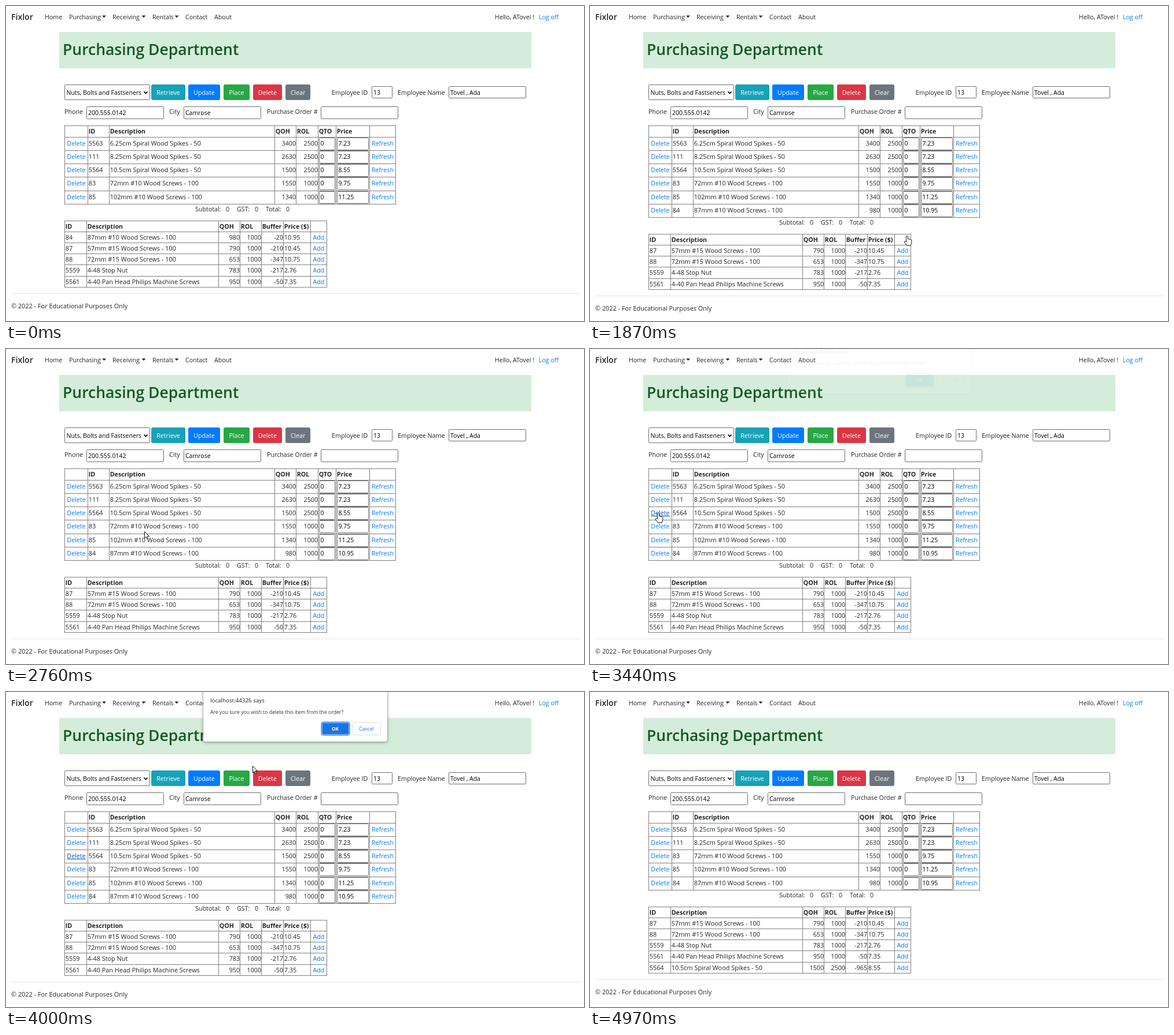
These frames come from a looping animation (999x546 px, 6230 ms). An HTML page:

```html
<!DOCTYPE html>
<html lang="en">
<head>
<meta charset="utf-8">
<title>Purchasing Department</title>
<style>
  html, body { margin: 0; width: 100%; height: 100%; overflow: hidden; background: #fff; }
  svg { display: block; width: 999px; height: 546px; }
  text { font: 10.7px "Open Sans", "Noto Sans", sans-serif; fill: #212529; white-space: pre; }
  .left, .foot { font-size: 10.9px; }
  .bold { font-weight: 700; }
  .right { text-anchor: end; }
  .mid, .link { text-anchor: middle; }
  .field { font-size: 10.5px; fill: #000; }
  .link { fill: #007bff; }
  .hover { fill: #0056b3; text-decoration: underline; }
  .white { fill: #fff; }
  .brand { font-size: 14.1px; font-weight: 600; }
  .title { font-size: 26.5px; font-weight: 600; fill: #155724; }
  .says { font-size: 9.8px; fill: #202124; }
  .small { font-size: 8.7px; fill: #333; }
  .ok { font-size: 8.3px; font-weight: 700; fill: #fff; }
  .cancel { font-size: 8.3px; fill: #1a73e8; }
</style>
</head>
<body>
<svg id="stage" viewBox="0 0 999 546"></svg>
<script>
const LOOP = 6230, FRAME = 70, FIRST_FRAME = 10;

// id | description | on hand | reorder level | price | already ordered
const PARTS = `
5563|6.25cm Spiral Wood Spikes - 50|3400|2500|7.23
111|8.25cm Spiral Wood Spikes - 50|2630|2500|7.23
5564|10.5cm Spiral Wood Spikes - 50|1500|2500|8.55|35
83|72mm #10 Wood Screws - 100|1550|1000|9.75
85|102mm #10 Wood Screws - 100|1340|1000|11.25
84|87mm #10 Wood Screws - 100|980|1000|10.95
87|57mm #15 Wood Screws - 100|790|1000|10.45
88|72mm #15 Wood Screws - 100|653|1000|10.75
5559|4-48 Stop Nut|783|1000|2.76
5561|4-40 Pan Head Philips Machine Screws|950|1000|7.35`
  .trim().split("\n").map(line => {
    const [id, description, onHand, reorder, price, ordered = 0] = line.split("|");
    return { id, description, onHand, reorder, price, buffer: +onHand + +ordered - reorder };
  });

const text = (x, y, s, cls = "", id = "") =>
  `<text x="${x}" y="${y}" class="${cls}" id="${id}">${s}</text>`;
const rect = (x, y, w, h, fill, stroke = "none", r = 0) =>
  `<rect x="${x}" y="${y}" width="${w}" height="${h}" rx="${r}" fill="${fill}" stroke="${stroke}"/>`;
const crisp = v => Math.floor(v) + 0.5;
const input = (x, y, w, h, value) =>
  rect(crisp(x), crisp(y), w - 1, h - 1, "#fff", "#6f6f6f", 1) + text(x + 3, y + 15, value, "field");
const button = (x, w, label, color) =>
  rect(x, 136, w, 27, color, "none", 3) + text(x + w / 2, 154, label, "mid white");
const caret = x => `<path d="M${x} 16.5h7l-3.5 3.7z" fill="#212529"/>`;

const column = (width, kind, header, value) => ({ width, kind, header, value });
const ORDER_COLUMNS = [
  column(40, "link", "", () => "Delete"),
  column(37, "left", "ID", p => p.id),
  column(286, "left", "Description", p => p.description),
  column(37, "right", "QOH", p => p.onHand),
  column(38, "right", "ROL", p => p.reorder),
  column(31, "field", "QTO", () => 0),
  column(58, "field", "Price", p => p.price),
  column(45, "link", "", () => "Refresh")
];
const STOCK_COLUMNS = [
  column(38, "left", "ID", p => p.id),
  column(228, "left", "Description", p => p.description),
  column(37, "right", "QOH", p => p.onHand),
  column(37, "right", "ROL", p => p.reorder),
  column(38, "right", "Buffer", p => p.buffer),
  column(47, "left", "Price ($)", p => p.price),
  column(28, "link", "", () => "Add")
];

function cell(kind, x, width, y, value, id) {
  if (kind === "field") return input(x + 2, y - 14, width - 3, 22, "") + text(x + 4.5, y, value, kind);
  const offset = { left: 1.7, right: width, link: width / 2 + 0.5 }[kind];
  return text(x + offset, y, value, kind, id);
}

function table(name, columns, parts, top, headHeight, rowHeight, drop) {
  const rowTop = i => Math.floor(top + headHeight + rowHeight * i);
  const bottom = rowTop(parts.length);
  let x = 101, cells = "", lines = `M${crisp(x)} ${crisp(top)}V${crisp(bottom)}`;
  for (const { width, kind, header, value } of columns) {
    cells += text(x + 1.7, top + 14, header, "bold");
    parts.forEach((part, i) => {
      const shown = value(part);
      cells += cell(kind, x, width, rowTop(i) + drop, shown, `${name}-${shown}-${part.id}`);
    });
    x += width;
    lines += `M${crisp(x)} ${crisp(top)}V${crisp(bottom)}`;
  }
  for (const y of [top, ...parts.map((_, i) => rowTop(i)), bottom]) lines += `M101 ${crisp(y)}H${x + 1}`;
  return `<path d="${lines}" fill="none" stroke="#808080"/>` + cells;
}

function tables(name, orderIds, stockIds) {
  const find = ids => ids.map(id => PARTS.find(p => p.id === String(id)));
  const shift = 23.3 * (orderIds.length - 5);
  const footer = shift + 19.2 * (stockIds.length - 5);
  const totals = [[327, "Subtotal:", 380], [399, "GST:", 430], [449, "Total:", 484]];
  return `<g id="${name}">` +
    table(name, ORDER_COLUMNS, find(orderIds), 207, 20, 23.3, 15) +
    totals.map(([x, label, zero]) => text(x, 356 + shift, label) + text(zero, 356 + shift, 0)).join("") +
    table(name, STOCK_COLUMNS, find(stockIds), 372 + shift, 19.2, 19.2, 14) +
    rect(9, Math.round(498 + footer), 983, 1, "#e5e5e5") +
    text(9, 523.5 + footer, "© 2022 - For Educational Purposes Only", "foot") + "</g>";
}

const page =
  text(9, 24, "Fixlor", "brand") +
  text(67, 23, "Home") + text(109, 23, "Purchasing") + caret(166) +
  text(184, 23, "Receiving") + caret(234.5) + text(253, 23, "Rentals") + caret(291.5) +
  text(310, 23, "Contact") + text(360, 23, "About") +
  text(913, 23, "Hello, ATovel !", "right") + text(938, 23, "Log off", "link") +
  rect(92, 45, 816, 63, "#d4edda") + text(98, 85, "Purchasing Department", "title") +
  input(101, 136, 148, 27, "") + text(104.5, 154, "Nuts, Bolts and Fastseners", "field") +
  `<path d="M238.5 148.5l3 3 3-3" fill="none" stroke="#000" stroke-width="1.6"/>` +
  button(251, 59, "Retrieve", "#17a2b8") + button(315, 55, "Update", "#007bff") +
  button(376, 45, "Place", "#28a745") + button(427, 50, "Delete", "#dc3545") +
  button(483, 43, "Clear", "#6c757d") +
  text(563, 154, "Employee ID") + input(632, 139, 36, 21, "13") +
  text(677, 154, "Employee Name") + input(765, 139, 134, 21, "Tovel , Ada") +
  text(101, 187, "Phone") + input(139, 174, 134, 22, "200.555.0142") +
  text(282, 187, "City") + input(307, 174, 134, 22, "Camrose") +
  text(451, 187, "Purchase Order #") + input(544, 174, 134, 22, "");

const dialog = `<g id="dialog">` +
  `<rect x="341" y="-20" width="318" height="106" rx="4" fill="#fff" stroke="#c4c4c4" stroke-width=".6"
    style="filter:drop-shadow(0 1px 2.5px rgba(0,0,0,.4))"/>` +
  text(353, 17.5, "localhost:44326 says", "says") +
  text(353, 37.5, "Are you sure you wish to delete this item from the order?", "small") +
  rect(545, 52, 49, 23, "#1a73e8", "none", 3) +
  `<g id="focus">${rect(546, 53, 47, 21, "none", "#fff", 2)}${rect(545, 52, 49, 23, "none", "#1a73e8", 3)}</g>` +
  text(569, 66.5, "OK", "ok mid") +
  rect(599.5, 52.5, 48, 22, "#fff", "#dadce0", 3) + text(623, 66.5, "Cancel", "cancel mid") + "</g>";

const cursor = `<g id="cursor" fill="#fff" stroke="#000" stroke-width=".9" stroke-linejoin="round">
  <path id="arrow" d="M.5.5V12L3.1 9.6 4.9 13.7 6.7 12.9 4.9 8.8H8.6Z"/>
  <path id="hand" d="M-1.5 10V1.2Q0-.8 1.5 1.2V6Q3 5 4 6.5 5.5 5.6 6.2 7 7.6 6.5 7.8 8V12L6.3 17.2H-.5L-4.8 11.2Q-4.6 8.4-1.5 10.5Z"/>
</g>`;

const $ = id => document.getElementById(id);
$("stage").innerHTML = page +
  tables("before", [5563, 111, 5564, 83, 85], [84, 87, 88, 5559, 5561]) +
  tables("added", [5563, 111, 5564, 83, 85, 84], [87, 88, 5559, 5561]) +
  tables("removed", [5563, 111, 83, 85, 84], [87, 88, 5559, 5561, 5564]) +
  dialog + cursor;

// Pointer moves: power 2 slows towards the end, bow lifts the path
const ENTRY = { x: 958, y: 440 };
const MOVES = [
  { start: 580, end: 1140, x: 612, y: 414, power: 2 },
  { start: 1210, end: 1610, x: 548, y: 398, power: 2 },
  { start: 2350, end: 3180, x: 118, y: 284, power: 2 },
  { start: 3440, end: 4280, x: 580, y: 70, power: 1, bow: 15 },
  { start: 4490, end: 4900, x: 960, y: 420, power: 1 }
];

const ramp = (t, start, end) => Math.min(1, Math.max(0, (t - start) / (end - start)));
const within = (t, start, end) => t >= start && t < end;
const show = (id, on) => { $(id).style.display = on ? "" : "none"; };

function pointerAt(t) {
  let { x, y } = ENTRY;
  for (const move of MOVES) {
    const p = 1 - (1 - ramp(t, move.start, move.end)) ** move.power;
    x += (move.x - x) * p;
    y += (move.y - y) * p - (move.bow || 0) * Math.sin(Math.PI * p);
  }
  return [Math.round(x), Math.round(y)];
}

function draw(time) {
  show("before", time < 1870);
  show("added", within(time, 1870, 4710));
  show("removed", time >= 4710);
  $("before-Add-84").classList.toggle("hover", within(time, 1480, 1870));
  $("added-Delete-5564").classList.toggle("hover", within(time, 3110, 4430));

  // Moving things are redrawn at a steady screen rate
  const t = Math.floor((time - FIRST_FRAME) / FRAME) * FRAME + FIRST_FRAME;
  const opacity = ramp(t, 3430, 3580) - ramp(t, 4480, 4640);
  $("dialog").setAttribute("opacity", opacity);
  $("dialog").setAttribute("transform", `translate(0 ${10 * (opacity - 1)})`);
  show("focus", time < 4360);

  const pointing = within(time, 1480, 2350) || within(time, 3110, 3650);
  show("cursor", within(time, 580, 4920));
  show("arrow", !pointing);
  show("hand", pointing);
  $("cursor").setAttribute("transform", `translate(${pointerAt(t)})`);
}

const started = performance.now();
function tick() {
  draw((performance.now() - started) % LOOP);
  requestAnimationFrame(tick);
}
tick();
</script>
</body>
</html>
```
